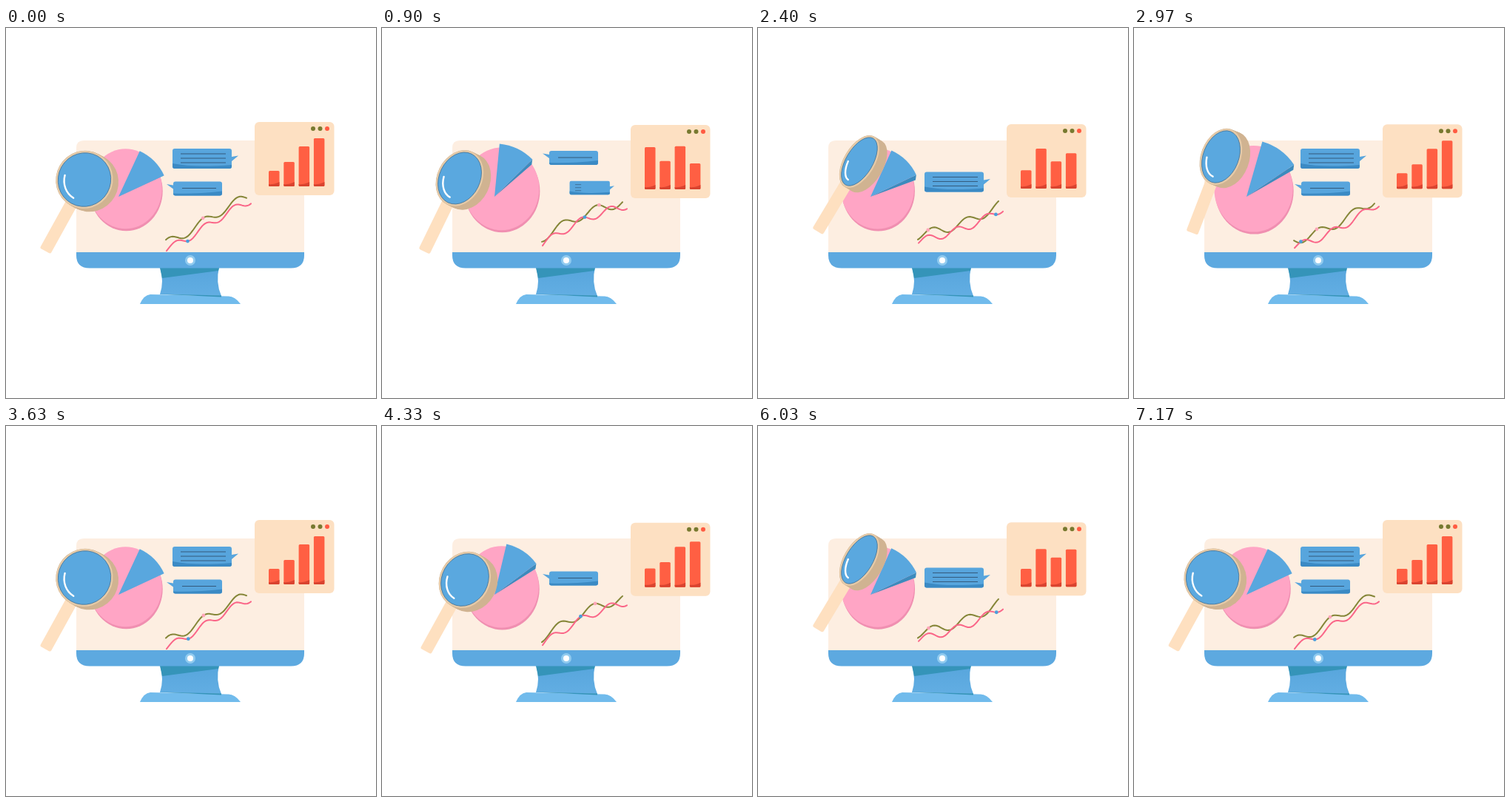
Write an HTML page that moves like this. It is 500 px wide and 500 px high and loops after 7210 ms.

```html
<!DOCTYPE html>
<html lang="en">
<head>
<meta charset="utf-8">
<title>Data analysis</title>
<style>
  html, body { margin: 0; width: 100%; height: 100%; overflow: hidden; background: #fff; }
  svg { display: block; width: 100vw; height: 100vh; }
</style>
</head>
<body>
<svg viewBox="0 0 500 500">
  <defs>
    <linearGradient id="neck" x2="0" y2="1">
      <stop offset="0" stop-color="#57a5dc"/><stop offset="1" stop-color="#62aee3"/>
    </linearGradient>
  </defs>

  <path fill="#71bbec" d="M181 373Q186 361 195 360L300 362.500Q309 362 317 373Z"/>
  <path fill="url(#neck)" d="M208 323Q214 342 208 360L291 362Q283 344 288 323Z"/>
  <path fill="#3594b9" d="M208 324H288L287 328L211 338ZM207 359.500L291 361.500V363.500Z"/>
  <path fill="#fdeee1" d="M95 304V162Q95 152 105 152H393Q403 152 403 162V304Z"/>
  <path fill="#5da9e0" d="M95 303H403V307Q403 324.500 385 324.500H113Q95 324.500 95 307Z"/>
  <circle cx="249" cy="314" r="7" fill="#91cbef"/>
  <circle cx="249" cy="314" r="4" fill="#fff"/>

  <ellipse id="pieRim" fill="#f08fb1"/>
  <ellipse id="pie" fill="#ffa5c5"/>
  <path id="wedgeSide" fill="#3c8bbd"/>
  <path id="wedge" fill="#59a7de"/>

  <g id="bigBubble">
    <path fill="#57a5dd" d="M3 0H77Q80 0 80 3V11L89 9.500L80 17V24Q80 27 77 27H3Q0 27 0 24V3Q0 0 3 0Z"/>
    <path fill="#3b8ac4" d="M0 20Q30 26 80 22V24Q80 27 77 27H3Q0 27 0 24Z"/>
    <path id="bigLines" fill="none" stroke="#34597b"/>
  </g>
  <g id="smallBubble">
    <path fill="#57a5dd" d="M3 0H63Q66 0 66 3V16Q66 19 63 19H3Q0 19 0 16V10L-9 3.500L0 5V3Q0 0 3 0Z"/>
    <path fill="#3b8ac4" d="M0 16Q30 17 66 13V16Q66 19 63 19H3Q0 19 0 16Z"/>
    <path id="smallLines" fill="none" stroke="#34597b"/>
  </g>

  <g fill="none" stroke-width="2" stroke-linecap="round" stroke-linejoin="round">
    <path id="olive" stroke="#858638"/>
    <path id="rose" stroke="#fa6688"/>
  </g>
  <circle id="roseDot" r="2.400" fill="#ffa5b8"/>
  <circle id="blueDot" r="2.400" fill="#4b9fdc"/>

  <g id="lens">
    <rect x="-8" y="20" width="16.500" height="90" rx="2.500" fill="#fee0c0"/>
    <g id="rim" fill="#d0b391"></g>
    <ellipse id="front" fill="#e5caa8"/>
    <ellipse id="glass" fill="#5aa8df" stroke="#46779b" stroke-width=".8"/>
    <path id="shine" fill="none" stroke="#fff" stroke-width="2.400" stroke-linecap="round"/>
  </g>

  <g id="panel">
    <rect x="336" y="127" width="107.500" height="99" rx="6" fill="#fde0c2"/>
    <g id="bars"></g>
    <circle cx="415" cy="136" r="3" fill="#77792f"/>
    <circle cx="424.500" cy="136" r="3" fill="#77792f"/>
    <circle cx="434" cy="136" r="3" fill="#ff5b42"/>
  </g>
</svg>
<script>
const LOOP = 7210, CYCLE = LOOP / 2, TAU = 2 * Math.PI;
const { cos, sin, PI } = Math;
const el = Object.fromEntries([...document.querySelectorAll('[id]')].map(e => [e.id, e]));
const set = (node, attrs) => { for (const k in attrs) node.setAttribute(k, attrs[k]); };
const add = (parent, tag, attrs = {}) => {
  const node = document.createElementNS('http://www.w3.org/2000/svg', tag);
  set(node, attrs);
  return parent.appendChild(node);
};
const clamp = v => Math.min(1, Math.max(0, v));
const lerp = (a, b, p) => a + (b - a) * p;
const ease = (t, from, span) => (1 - cos(PI * clamp((t - from) / span))) / 2;
const swell = (t, peak, reach) => 1 - ease(Math.abs(t - peak), 0, reach);

// Time, glass centre, lean of the handle in degrees, visible half-width of the glass
const lensKeys = [
  { t: 0, pose: [106, 205, 29, 35.5] },
  { t: 725, pose: [112, 208, 29, 31] },
  { t: 900, pose: [105, 203, 26, 27.5] },
  { t: 1730, pose: [125, 188, 25, 20] },
  { t: 2425, pose: [137, 180.5, 31, 18] },
  { t: 2970, pose: [117.5, 174, 21, 24] },
];
const lensAt = t => {
  const i = lensKeys.findLastIndex(key => key.t <= t);
  const from = lensKeys[i], to = lensKeys[i + 1] || { ...lensKeys[0], t: CYCLE };
  const p = ease(t, from.t, to.t - from.t);
  return from.pose.map((v, c) => lerp(v, to.pose[c], p));
};

const ascending = [21, 33, 54, 65], mixed = [63, 39, 59, 30], peaked = [26, 61, 31, 42];
const bars = ascending.map(() => ({
  body: add(el.bars, 'rect', { width: 14.5, rx: 1.5, fill: '#ff5f43' }),
  shade: add(el.bars, 'path', { fill: '#d9432f' }),
}));
const rimLayers = Array.from({ length: 7 }, () => add(el.rim, 'ellipse'));

function drawPie(t) {
  const first = swell(t, 950, 500), second = swell(t, 2950, 650);
  const scale = 1 + .035 * first + .08 * second;
  const angle = 25 - 20 * first - 9 * second;
  const r = 68 + 4 * first + 9.5 * second;
  const thick = 7 * clamp(2.5 * sin(PI * t / CYCLE));
  const size = { rx: 49.2 * scale, ry: 54 * scale };
  set(el.pieRim, { cx: 162.5, cy: 220.3, ...size });
  set(el.pie, { cx: 161.5, cy: 217.3, ...size });
  const corner = deg => [152 + r * sin(deg * PI / 180), 228 - r * cos(deg * PI / 180)];
  const [x1, y1] = corner(angle), [x2, y2] = corner(angle + 40);
  set(el.wedge, { d: `M152 228L${x1} ${y1}A${r} ${r} 0 0 1 ${x2} ${y2}Z` });
  set(el.wedgeSide, { d: `M152 228L${x2} ${y2}L${x2 - 1} ${y2 + thick}Z` });
}

function drawBars(t) {
  set(el.panel, { transform: `translate(0 ${2 - 2 * cos(2 * TAU * t / CYCLE)})` });
  const toMixed = ease(t, 660, 320), toPeaked = ease(t, 1200, 350), back = ease(t, 2295, 320);
  bars.forEach(({ body, shade }, i) => {
    const high = lerp(lerp(ascending[i], mixed[i], toMixed), peaked[i], toPeaked);
    const height = lerp(high, ascending[i], back), x = 355 + 20.3 * i;
    set(body, { x, y: 214 - height, height });
    set(shade, { d: `M${x} 211Q${x + 6} 212 ${x + 14.5} 208V212.5q0 1.5 -1.5 1.5h-11.5q-1.5 0 -1.5 -1.5Z` });
  });
}

function drawBubble(node, x, y, scale, tipX, tipY) {
  set(node, {
    transform: `translate(${x + tipX} ${y + tipY}) scale(${scale}) translate(${-tipX} ${-tipY})`,
    visibility: scale > .01 ? 'visible' : 'hidden',
  });
}

function drawBubbles(t) {
  const early = t < 700, grow = ease(t, 790, 180);
  const bigScale = early ? 1 - ease(t, 430, 180) : grow;
  const bigY = early ? 163 : lerp(199 + 15 * (1 - grow), 163, ease(t, 2320, 350));
  drawBubble(el.bigBubble, 225, bigY, bigScale, 89, 9.5);
  const bigLine = early ? 61 : 61 * ease(t, 850, 175);
  set(el.bigLines, { d: [7, 13, 19].map(y => `M11 ${y}h${bigLine}`).join('') });

  const late = t > 2400;
  const smallScale = late ? ease(t, 2500, 180) : 1 - ease(t, 2140, 180);
  const smallY = late ? 207.5 : lerp(207.5, 163, ease(t, 610, 350));
  drawBubble(el.smallBubble, 226, smallY, smallScale, -9, 3.5);
  set(el.smallLines, { d: `M12 9h${late ? 46 * ease(t, 2560, 175) : 46}` });
}

// A rising trend, a slow swell shared by both curves, and a shorter ripple on each
const swayAt = (u, turn) => 7 * cos(PI * u + TAU * turn);
const oliveAt = (u, turn) =>
  284 - 48 * u + swayAt(u, turn) - 6 * cos(TAU * (2.37 * u - .1 - 2 * turn));
const roseAt = (u, turn) =>
  292 - 52 * u + swayAt(u, turn) - 5 * cos(TAU * (2.9 * u - .32));

function drawCurve(path, dot, yAt, left, right, turn, along) {
  const points = Array.from({ length: 49 }, (_, i) =>
    `${lerp(left, right, i / 48)} ${yAt(i / 48, turn)}`);
  set(path, { d: 'M' + points.join('L') });
  set(dot, { cx: lerp(left, right, along), cy: yAt(along, turn) });
}

// The glass turns about the axis of its handle
function drawLens(t) {
  const [x, y, lean, rx] = lensAt(t), ry = 36.5;
  const depth = 7 + 6 * Math.sqrt(1 - (rx / ry) ** 2);
  set(el.lens, { transform: `translate(${x} ${y}) rotate(${lean})` });
  rimLayers.forEach((layer, i) =>
    set(layer, { cx: depth * i / (rimLayers.length - 1), rx: rx + 3, ry: ry + 3 }));
  set(el.front, { rx: rx + 2.8, ry: ry + 2.8 });
  set(el.glass, { rx, ry });

  const sx = rx * .76, sy = ry * .79;
  const at = deg => `${sx * cos(deg * PI / 180)} ${sy * sin(deg * PI / 180)}`;
  set(el.shine, { d: `M${at(165)}A${sx} ${sy} 0 0 0 ${at(92)}` });
}

function draw(now) {
  const t = now % CYCLE, turn = t / CYCLE;
  drawPie(t);
  drawBars(t);
  drawBubbles(t);
  drawCurve(el.olive, el.roseDot, oliveAt, 216, 325, turn, (turn + .46) % 1);
  drawCurve(el.rose, el.blueDot, roseAt, 217, 331, turn, (turn + .25) % 1);
  drawLens(t);
}

const start = performance.now();
function tick() {
  draw(performance.now() - start);
  requestAnimationFrame(tick);
}
tick();
</script>
</body>
</html>
```
